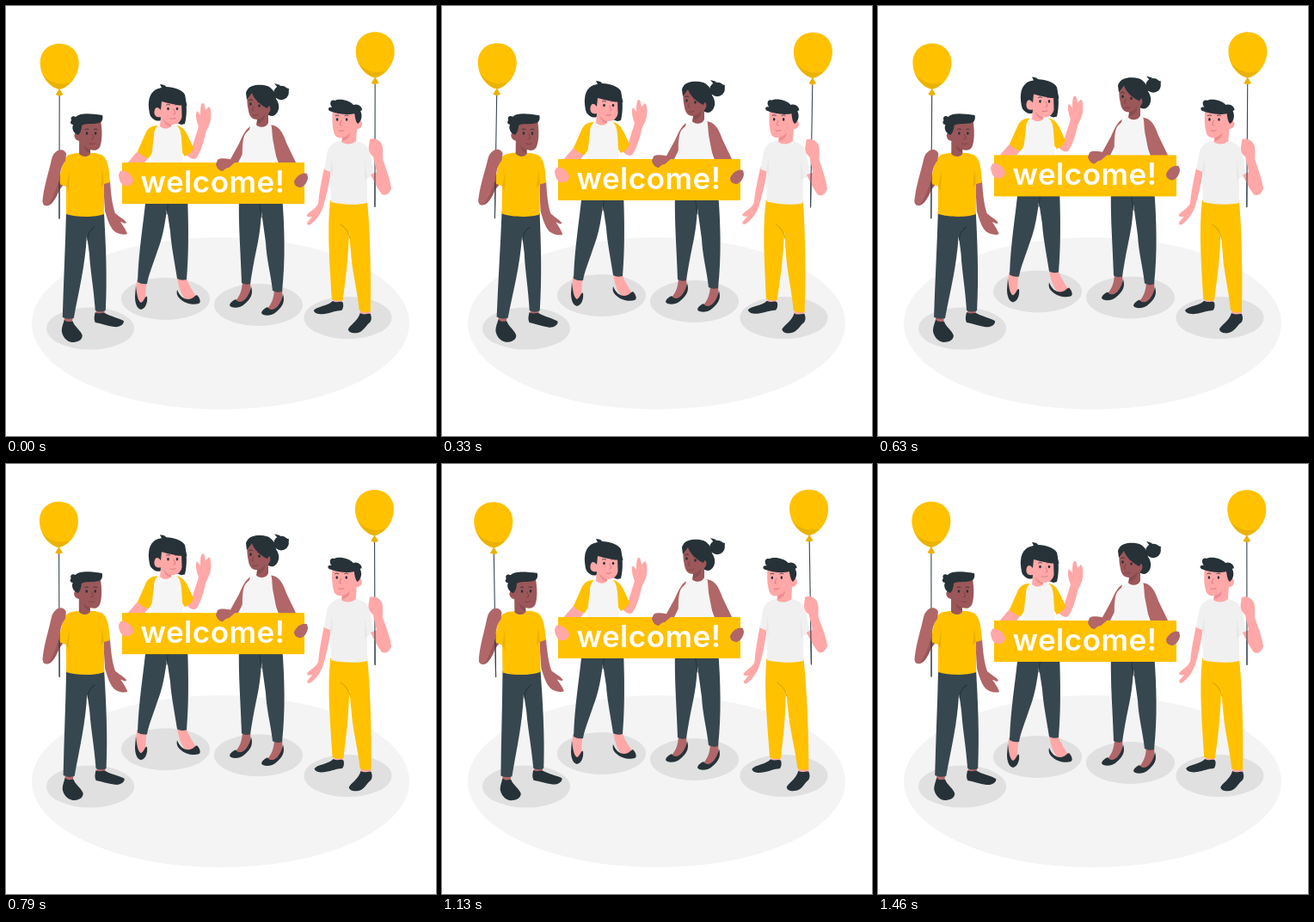
Write an HTML page with a canvas that moves like this. It is 500 px wide and 500 px high and loops after 1.5 s.

```html
<!DOCTYPE html>
<html lang="en">
<head>
<meta charset="utf-8">
<title>Welcome</title>
<style>
html, body { margin: 0; width: 100%; height: 100%; overflow: hidden; background: #fff; }
canvas { display: block; width: 500px; height: 500px; }
</style>
</head>
<body>
<canvas id="stage"></canvas>
<script>
const LOOP = 1500, LEAD = 20;
const YELLOW = '#ffc100', INK = '#263238', SLATE = '#37474f', FLOOR = '#f4f4f4', SHADOW = '#e0e0e0';
const PINK = '#ffa8a7', BROWN = '#b16668', COCOA = '#9b5759', SHIRT = '#f0f0f0', TOP = '#f5f5f5';
const SHADE = 'rgba(0,0,0,.12)';

const canvas = document.getElementById('stage');
const ctx = canvas.getContext('2d');
const ratio = window.devicePixelRatio || 1;
canvas.width = canvas.height = 500 * ratio;

const paths = new Map();
function path(d) {
  if (!paths.has(d)) paths.set(d, new Path2D(d));
  return paths.get(d);
}
function fill(color, d) {
  ctx.fillStyle = color;
  ctx.fill(path(d));
}
function line(color, width, d) {
  ctx.strokeStyle = color;
  ctx.lineWidth = width;
  ctx.stroke(path(d));
}
function oval(color, x, y, rx, ry) {
  ctx.fillStyle = color;
  ctx.beginPath();
  ctx.ellipse(x, y, rx, ry, 0, 0, Math.PI * 2);
  ctx.fill();
}
function moved(x, y, draw) {
  ctx.save();
  ctx.translate(x, y);
  draw();
  ctx.restore();
}
function swayed(x, y, angle, draw) {
  ctx.save();
  ctx.translate(x, y);
  ctx.rotate(angle);
  ctx.translate(-x, -y);
  draw();
  ctx.restore();
}
function eyes(...points) {
  for (const [x, y] of points) {
    oval(INK, x, y, 1.3, 1.8);
    line(INK, 0.8, `M${x - 2} ${y - 4.5}q2 -1.4 4 0`);
  }
}

// Knot sits at the origin, string hangs below it.
function balloon(x, y) {
  moved(x, y, () => {
    line(SLATE, 1.1, 'M0 4V150');
    fill('#ecb200', 'M0 -1L-4.3 6Q0 9 4.3 6Z');
    fill(YELLOW, 'M0 -53.3C13 -53.3 22.5 -44 22.5 -31C22.5 -15 11 -2 0 0C-11 -2 -22.5 -15 -22.5 -31C-22.5 -44 -13 -53.3 0 -53.3Z');
    fill('rgba(0,0,0,.08)', 'M-20.5 -20C-14 -8 0 -4 13 -8C9 -4 5 -1 0 0C-9 -2 -17 -11 -20.5 -20Z');
  });
}

function leftMan() {
  fill(BROWN, 'M105 354H115L114 361H105ZM68 360H78L77 370H68Z');
  fill(INK, 'M68 365C72 369 76 366 78 367C80 373 87 377 89 383C89 389 83 391 77 391C70 390 66 384 65 378C65 373 67 369 68 365Z');
  fill(INK, 'M104 356C108 359 112 356 115 357C122 361 132 363 137 366C138 370 132 374 126 373C118 372 110 369 104 368C102 364 103 360 104 356Z');
  fill(SLATE, 'M70 240H114C116 275 118 315 116 354Q110 357 104 354C102 327 98 306 97 288C96 280 95 273 94 268C92 303 85 330 79 363Q72 365 66 362C67 322 69 282 70 240Z');
  line(INK, 1, 'M95 272Q95 262 103 257');
  fill(BROWN, 'M113 204L121 203C122 220 124 233 127 241C133 246 139 249 140 252C138 254 135 251 133 251C136 255 140 261 141 265C136 267 128 264 125 261C120 255 118 248 115 238Z');
  fill(COCOA, 'M55 196L73 200L62 214C59 222 54 231 49 232C44 233 42 230 43 225Z');
  fill(YELLOW, 'M86 171C76 171 70 173 68 179C64 188 62 198 62 207L70 210L70 242C82 246 104 246 114 242L114 207L121 205C120 192 119 177 111 173L104 171Z');
  fill('rgba(0,0,0,.08)', 'M70 210L74 191L73 216ZM114 207L112 190L110 211Z');
  balloon(62, 97);
  fill(BROWN, 'M60 168C64 166 69 168 70 172L69 180C64 186 63 193 62 202C58 214 53 228 48 232C43 232 42 229 43 222C45 207 50 192 53 178C54 173 57 170 60 168Z');
  line(SLATE, 1.1, 'M62 206V247');
  fill(COCOA, 'M84 134L110 133C112 145 112 157 109 164C106 169 101 168 98 167L98 172C95 176 89 176 85 172L85 157C79 156 77 148 83 146Z');
  fill(SHADE, 'M98 167C94 166 91 163 90 161C91 167 94 170 98 171Z');
  fill(INK, 'M76 133C74 129 78 127 81 129C86 124 98 125 112 127C113 131 112 135 108 136C100 138 92 136 88 139C88 143 87 147 84 150C78 148 76 142 78 138C75 138 74 135 76 133Z');
  eyes([94, 148], [104, 148]);
  line('#7c413d', 0.9, 'M100 149L102 154L99 155M97 160Q100 161.5 103 160');
}

function rightMan() {
  fill(PINK, 'M381 340H391V348H381ZM412 354H424V361H412Z');
  fill(INK, 'M380 343C385 346 389 342 392 345C393 349 392 353 390 354C384 354 378 357 371 358C365 359 359 358 358 354C362 349 375 349 380 343Z');
  fill(INK, 'M412 357C417 360 421 357 424 358C426 363 425 367 422 369C418 373 415 379 409 380C404 381 399 380 398 376C400 371 409 367 412 357Z');
  fill(YELLOW, 'M377 226H420C423 255 425 310 424 355Q417 358 411 354C409 332 402 306 401 284C400 277 400 270 399 262C398 300 394 323 392 342Q385 344 379 341C377 303 373 263 377 226Z');
  line('#d9a400', 1, 'M400 270Q398 260 389 254');
  fill(PINK, 'M370 188L378 190C376 208 371 226 369 233C366 242 360 250 354 254C351 256 349 253 351 251L356 245C353 246 349 245 350 243C353 239 360 236 363 230C364 217 367 203 370 188Z');
  fill(SHIRT, 'M386 157C378 160 374 165 373 173L370 190L377 193L378 228C390 231 408 232 420 229L420 200L428 198C426 188 425 173 420 164C416 159 411 158 407 157Z');
  fill('rgba(0,0,0,.04)', 'M377 193L379 175L380 199ZM420 200L417 178L417 203Z');
  balloon(429, 83.5);
  fill(PINK, 'M423 155C428 153 434 155 437 161C439 166 438 173 438 178C442 190 447 202 448 212C446 219 441 221 437 219C432 212 427 203 424 196L431 193C430 187 428 181 427 175C422 172 421 166 422 162Z');
  line(SLATE, 1.1, 'M429 194V233');
  fill(PINK, 'M380 119L406 123L407 134C410 131 414 133 414 137C414 141 411 143 408 143L407 157C402 162 393 161 390 158L391 153C386 154 382 152 381 146C379 138 379 130 380 119Z');
  fill('rgba(190,60,70,.25)', 'M391 153C396 152 399 149 400 147C400 153 396 156 391 157Z');
  fill(INK, 'M376 122C373 119 376 117 379 118C375 113 378 108 382 110C388 107 400 110 404 115C409 113 414 117 414 121L412 122C415 128 413 134 409 137C406 134 406 129 405 125C398 127 386 126 376 122Z');
  eyes([385, 132], [396, 132]);
  line('#d9767a', 0.9, 'M390 133L388 138L390 139M387 145Q390 146.5 393 144.5');
}

function lightWoman() {
  fill(PINK, 'M152 318L164 320C161 332 164 342 160 348L151 343ZM199 315H209C212 324 217 331 222 339L211 343C205 338 201 330 199 315Z');
  fill(INK, 'M151 325C152 334 153 343 157 345C161 343 162 336 164 338C165 345 162 352 157 353C152 352 150 345 150 338Z');
  fill(INK, 'M199 330C202 337 206 341 212 341C217 341 219 337 222 336C226 340 227 345 224 346C218 348 208 346 203 341C199 338 198 334 199 330Z');
  fill(SLATE, 'M163 220H211C212 245 213 285 210 318Q204 320 199 317C196 297 192 278 191 262L187 236C184 262 180 275 175 288C171 300 166 312 164 323Q158 324 153 321C154 285 160 252 163 220Z');
  line(INK, 1, 'M187 242L189 225');
  fill(PINK, 'M153 169L166 176L150 196L134 196C137 186 146 177 153 169Z');
  fill(PINK, 'M206 168L217 163C219 155 222 147 224 140C221 133 220 125 222 122L226 127C226 121 226 113 229 113C231 113 231 117 232 121L236 117C238 118 239 125 238 132C237 139 233 144 232 148C230 158 226 170 222 176C219 180 213 178 206 168Z');
  fill(YELLOW, 'M176 139C168 139 164 143 161 151L153 169C157 174 162 176 166 177L175 163ZM198 139C206 140 209 146 212 152L218 165C216 170 212 173 208 175L199 162Z');
  fill(TOP, 'M179 138C174 140 172 145 172 151L168 185H206L204 153C203 145 202 140 196 138Z');
  fill(INK, 'M181 95C188 92 204 96 208 103C210 112 211 125 208 137L204 138L183 130C179 136 172 134 168 128C164 117 167 99 181 95Z');
  fill(PINK, 'M180 109L204 111L204.5 129C203 136 198 138 192 138V140C188 144 183 143 179 140L180 129C173 131 170 123 173 119C175 116 178 118 180 120Z');
  fill('rgba(190,60,70,.25)', 'M192 138C188 137 185 134 183 131C184 137 188 140 192 140Z');
  fill(INK, 'M166 112C167 98 177 93 189 96C201 97 208 103 210.5 116C200 116 189 113 181 111L180 121C175 114 171 120 173 128C168 126 165 119 166 112ZM182 97L179 91Q187 91 187 97Z');
  eyes([188.5, 119.5], [199, 119.5]);
  line('#d9767a', 0.9, 'M195 120L197 125L195 126M191 131Q194 132 197 130.5');
}

function darkWoman() {
  for (const [x, y] of [[0, 0], [37, 9]]) moved(x, y, () => {
    fill(BROWN, 'M275 318H284C285 330 284 337 279 345C273 349 268 348 264 346C271 339 275 332 275 318Z');
    fill(INK, 'M285 326C288 335 284 341 278 346C272 352 262 352 260 348C261 344 265 342 267 341C270 346 276 344 279 340C282 336 284 332 285 326Z');
  });
  fill(SLATE, 'M271 220H321C324 257 325 296 321 332Q315 334 310 331C308 312 303 295 302 275L297 239C296 258 294 270 291 284C288 298 286 310 284 323Q279 325 274 322C273 288 270 254 271 220Z');
  line(INK, 1, 'M297 246L294 225');
  fill(BROWN, 'M284 140C278 144 275 151 271 160L260 180L268 186L278 166ZM306 138C317 138 322 147 326 159L339 186L319 188L308 159Z');
  fill(TOP, 'M292 135C289 141 280 144 277 151C274 160 275 172 275 185H316L311 159C309 150 310 143 308 137Z');
  fill(INK, 'M281 97C285 91 296 91 304 93C311 96 314 103 314 108C320 116 317 126 310 128C304 128 298 122 295 114Z');
  oval(INK, 320, 101, 8.7, 8.3);
  fill(INK, 'M316 95L312 90L319 92ZM324 95L329 96L328 104Z');
  fill(COCOA, 'M281 100L290 100C296 108 301 112 303 115C308 114 309 122 305 125L305 136C302 142 294 142 291 138L292 132C286 132 283 128 282 122C280 114 280 107 281 100Z');
  fill(SHADE, 'M292 132C297 131 300 128 301 125C302 131 298 135 292 137Z');
  fill(INK, 'M279 101C281 93 292 91 302 93C310 96 314 103 313 113C310 113 306 114 304 119C296 115 289 109 286 101C284 104 282 106 280 109Z');
  eyes([284.5, 114], [294.5, 116]);
  line('#7c413d', 0.9, 'M288 117L286 121L288 122M287 127Q290 128 293 126.5');
}

function banner() {
  ctx.fillStyle = YELLOW;
  ctx.fillRect(135, 182, 212, 48);
  ctx.fillStyle = '#fff';
  ctx.font = '600 35px Inter, Lato, sans-serif';
  ctx.letterSpacing = '0.5px';
  ctx.textAlign = 'center';
  ctx.textBaseline = 'alphabetic';
  ctx.fillText('welcome!', 240.5, 217);
  fill(PINK, 'M133 192C139 190 146 196 148 202C148 207 143 210 138 209C134 208 131 202 131 196Z');
  fill(BROWN, 'M350 195C345 193 338 197 335 204C335 209 339 211 343 211C348 209 351 203 351 199Z');
  fill(BROWN, 'M246 179C250 176 256 178 260 178L266 182L259 188C256 188 254 190 252 192C248 192 245 188 244 184Z');
}

function draw(now) {
  const phase = (now + LEAD) % LOOP / LOOP * Math.PI * 2;
  const lift = -4.5 * (1 - Math.cos(phase));
  const sway = 0.0158 * Math.sin(phase);

  ctx.setTransform(ratio, 0, 0, ratio, 0, 0);
  ctx.fillStyle = '#fff';
  ctx.fillRect(0, 0, 500, 500);
  ctx.lineCap = 'round';

  oval(FLOOR, 249.5, 369, 219.5, 100);
  oval(SHADOW, 98, 375, 51, 24.5);
  oval(SHADOW, 397.5, 362.5, 51, 24.5);

  moved(0, lift, () => {
    oval(SHADOW, 185.5, 340.5, 51.5, 24.5);
    oval(SHADOW, 293.5, 347.5, 51.5, 24.5);
    lightWoman();
    darkWoman();
    banner();
  });
  swayed(95, 210, sway, leftMan);
  swayed(402, 205, sway, rightMan);
}

const start = performance.now();
function tick() {
  draw(performance.now() - start);
  requestAnimationFrame(tick);
}
tick();
</script>
</body>
</html>
```
